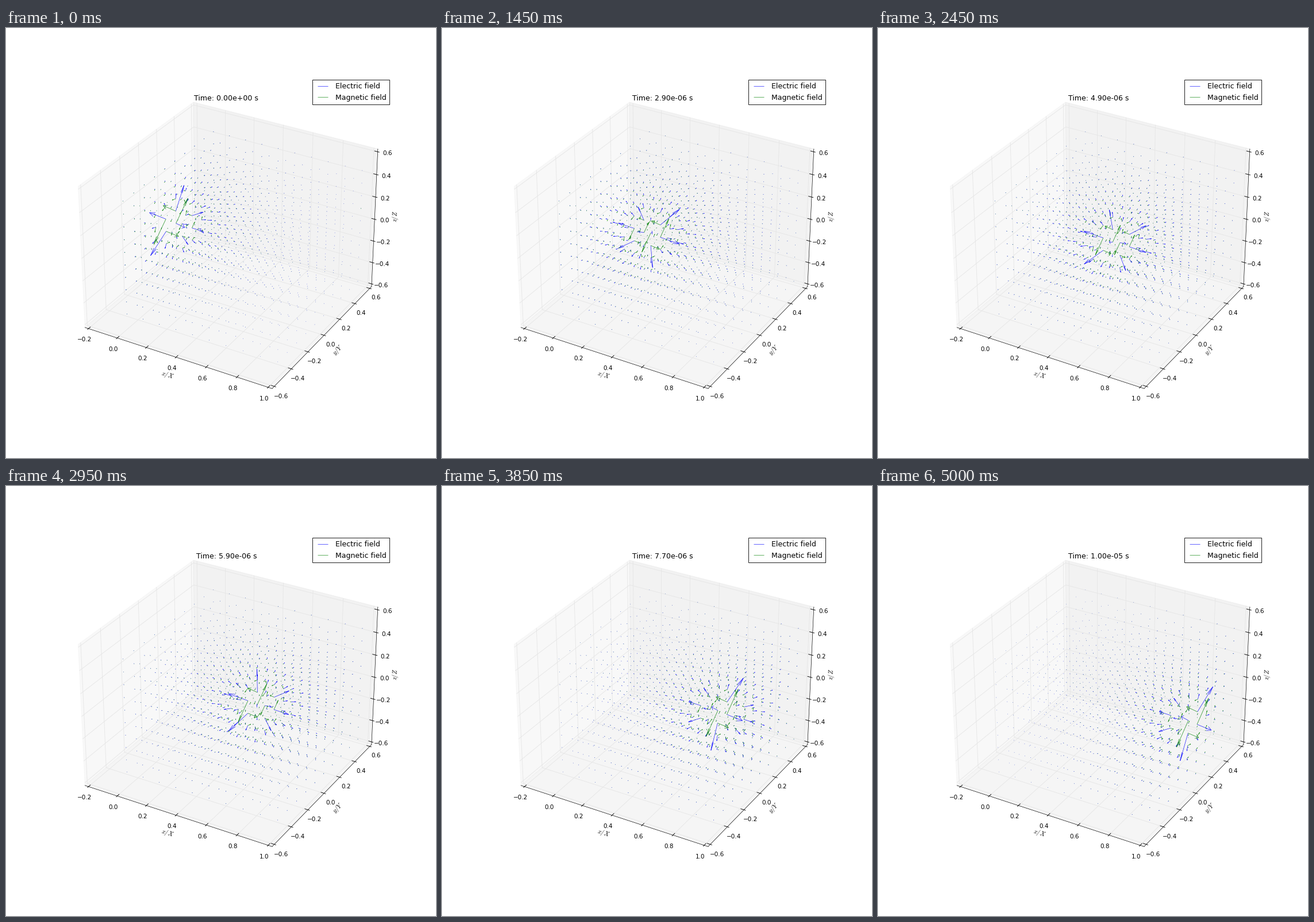
A matplotlib script that plays this animation: 748 px wide and 748 px high, repeating every 5.05 s.

```python
import math

import matplotlib.pyplot as plt
import numpy as np
from matplotlib.animation import FuncAnimation
from matplotlib.collections import LineCollection
from matplotlib.patches import Polygon

SIZE = 748
FRAMES = 101
FIELD_SCALE = 0.00123
HEAD_RATIO, HEAD_ANGLE = 0.3, math.radians(15)

plt.rcParams["font.family"] = "DejaVu Sans"
plt.rcParams["mathtext.fontset"] = "cm"

fig = plt.figure(figsize=(12, 12), dpi=SIZE / 12, facecolor="white")
ax = fig.add_axes((0, 0, 1, 1))
ax.set_xlim(0, SIZE)
ax.set_ylim(SIZE, 0)
ax.axis("off")

# Square drawing area of the 3D view, in pixels
LEFT, WIDTH = 0.125 * SIZE, 0.775 * SIZE
TOP = (SIZE - WIDTH) / 2

# Camera: elevation 30, azimuth -60, distance 10
ELEV, AZIM, DIST = math.radians(30), math.radians(-60), 10
TOWARD = np.array([math.cos(ELEV) * math.cos(AZIM),
                   math.cos(ELEV) * math.sin(AZIM), math.sin(ELEV)])
RIGHT = np.array([-math.sin(AZIM), math.cos(AZIM), 0])
UP = np.cross(TOWARD, RIGHT)

CENTER = np.array([0.4, 0, 0])
BOX = np.array([8, 8, 6]) / 7 / 1.2
LO = np.array([-0.225, -0.625, -0.625])
HI = np.array([1.025, 0.625, 0.625])


def project(points):
    """Map data coordinates (..., 3) to stage pixels (..., 2)."""
    p = (np.asarray(points, float) - CENTER) * BOX
    depth = DIST - p @ TOWARD
    x = LEFT + (p @ RIGHT / depth + 0.095) / 0.185 * WIDTH
    y = TOP + WIDTH - (p @ UP / depth + 0.095) / 0.185 * WIDTH
    return np.stack([x, y], axis=-1)


def lines(paths, color, width, z, cap="butt"):
    ax.add_collection(LineCollection([project(p) for p in paths], colors=color,
                                     linewidths=width, zorder=z, capstyle=cap),
                      autolim=False)


def draw_panes():
    (x0, y0, z0), (x1, y1, z1) = LO, HI
    panes = [
        (0.95, [(x0, y0, z0), (x0, y1, z0), (x0, y1, z1), (x0, y0, z1)]),
        (0.90, [(x0, y1, z0), (x1, y1, z0), (x1, y1, z1), (x0, y1, z1)]),
        (0.925, [(x0, y0, z0), (x1, y0, z0), (x1, y1, z0), (x0, y1, z0)]),
    ]
    for gray, corners in panes:
        ax.add_patch(Polygon(project(corners), closed=True, color=(gray,) * 3,
                             alpha=0.5, linewidth=1, zorder=0))


def draw_axis(index, base, wall, corner, tick_dir, name):
    """Draw one axis; base, wall and corner trace its grid lines."""
    start, end = np.array(base, float), np.array(base, float)
    start[index], end[index] = LO[index], HI[index]
    sign = np.where(start > CENTER, 1, -1)
    sign[index] = 0

    first = -0.2 if index == 0 else -0.6
    grid, ticks = [], []
    for k in range(7):
        value = round(first + 0.2 * k, 1) + 0.0
        path = np.array([base, wall, corner], float)
        path[:, index] = value
        grid.append(path)

        step = np.zeros(3)
        step[tick_dir] = sign[tick_dir]
        ticks.append([path[0] + 0.01 * step, path[0] - 0.02 * step])

        x, y = project(path[0] + 0.043 * sign)
        label = f"{abs(value):.1f}"
        ax.text(x, y, "\u2212" + label if value < 0 else label,
                fontsize=12, ha="center", va="top", zorder=3)

    lines(grid, "0.9", 1, 1)
    lines([[start, end]], "black", 0.75, 2, "projecting")
    lines(ticks, "black", 1, 2, "projecting")

    (xa, ya), (xb, yb) = project([start, end])
    angle = math.degrees(math.atan2(ya - yb, xb - xa))
    x, y = project((start + end) / 2 + 0.0932 * sign)
    ax.text(x, y, name, fontsize=12, ha="center", va="center",
            rotation=angle, rotation_mode="anchor", zorder=3)


draw_panes()
X0, Y0, Z0 = LO
X1, Y1, Z1 = HI
draw_axis(0, (0, Y0, Z0), (0, Y1, Z0), (0, Y1, Z1), 1, "$x/X$")
draw_axis(1, (X1, 0, Z0), (X0, 0, Z0), (X0, 0, Z1), 0, "$y/Y$")
draw_axis(2, (X1, Y1, 0), (X0, Y1, 0), (X0, Y0, 0), 0, "$z/Z$")

# Sample points of the field
side = np.linspace(-0.5, 0.5, 10)
nodes = np.stack(np.meshgrid(side + 0.49, side, side, indexing="ij"),
                 axis=-1).reshape(-1, 3)


def field_lines(color, label, z):
    group = LineCollection([], colors=color, linewidths=0.7, label=label, zorder=z)
    ax.add_collection(group, autolim=False)
    return group


electric = field_lines((0, 0, 1), "Electric field", 4)
magnetic = field_lines((0, 0.5, 0), "Magnetic field", 5)

title = ax.text(LEFT + WIDTH / 2, TOP + 0.08 * WIDTH - 5 * fig.dpi / 72, "",
                fontsize=14.4, ha="center", va="baseline", zorder=6)

ax.legend(handles=[electric, magnetic], loc="upper right",
          bbox_to_anchor=(LEFT + WIDTH, TOP), bbox_transform=ax.transData,
          fontsize=14.4, numpoints=2, scatterpoints=2, fancybox=False,
          framealpha=1, facecolor="white", edgecolor="black", borderpad=0.4,
          labelspacing=0.5, handlelength=2, handletextpad=0.8,
          borderaxespad=0.5)


def arrows(vec):
    """Segments of shafts and both barbs for vectors rooted at the nodes."""
    tips = nodes + vec
    flat = np.hypot(vec[:, 0], vec[:, 1])
    tilt = np.stack([-vec[:, 0] * vec[:, 2] / flat,
                     -vec[:, 1] * vec[:, 2] / flat, flat], axis=-1)
    along, across = vec * math.cos(HEAD_ANGLE), tilt * math.sin(HEAD_ANGLE)
    a, b, c, d = (project(p) for p in (nodes, tips,
                                       tips - HEAD_RATIO * (along + across),
                                       tips - HEAD_RATIO * (along - across)))
    return np.concatenate([np.stack(pair, axis=1)
                           for pair in ((a, b), (b, c), (b, d))])


def update(frame):
    charge = np.array([0.98 * frame / (FRAMES - 1), 0, 0])
    rel = nodes - charge
    e = FIELD_SCALE * rel / np.linalg.norm(rel, axis=1, keepdims=True) ** 3
    b = np.cross([1.0, 0.0, 0.0], e)
    electric.set_segments(arrows(e))
    magnetic.set_segments(arrows(b))
    title.set_text(f"Time: {frame * 1e-7:.2e} s")
    return electric, magnetic, title


def init():
    return update(0)


anim = FuncAnimation(fig, update, frames=FRAMES, init_func=init,
                     interval=50, repeat=True)
plt.show()
```
